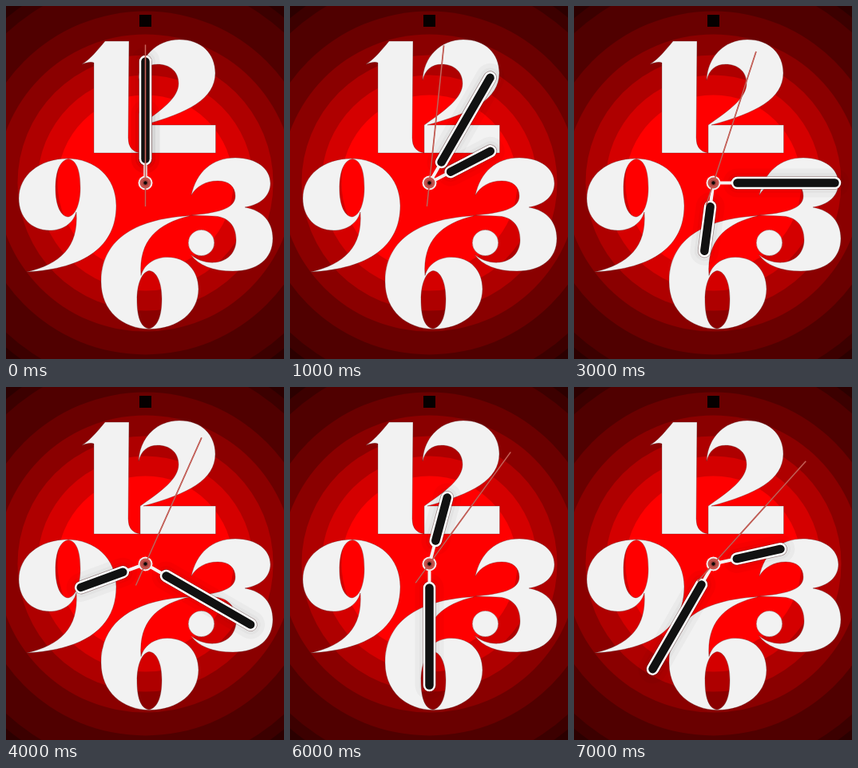
Animation of 348 by 442 pixels, one loop 8000 ms. Source, as an HTML page:

```html
<!DOCTYPE html>
<html lang="en">
<head>
<meta charset="utf-8">
<title>Red clock</title>
<style>
html, body { margin: 0; width: 100%; height: 100%; overflow: hidden; background: #2b0000; }
svg { display: block; width: 348px; height: 442px; }
.digits { fill: #f2f2f2; fill-rule: evenodd; stroke: #5a2020; stroke-opacity: .55; stroke-width: .6; }
.hand { fill: none; stroke-linecap: round; }
</style>
</head>
<body>
<svg viewBox="0 0 348 442">
  <defs>
    <path id="nine" d="M77 191C111 191 138 214 138 250C138 300 100 329 26 333C68 323 91 302 88 258C84 273 70 281 55 281C31 281 16 264 16 241C16 212 42 191 77 191Z
      M78 191.500C66 194 62 210 62 229C62 250 69 264 78 264C88 262 93 245 93 228C93 208 89 193 78 191.500Z"/>
  </defs>
  <g id="rings"></g>
  <rect x="167" y="11" width="15" height="15" fill="#050000"/>
  <g class="digits">
    <path d="M95 73C106 66 114 56 124 44H154L153 165Q153 182 168 184H110V71Q105 69 95 73Z"/>
    <path d="M166 93C167 64 188 42 217 42C245 42 262 60 262 84C262 116 228 134 172 149H262.500V184H168V149C195 130 216 115 216 97C216 82 205 73 190 73C177 73 169 80 166 93Z"/>
    <path d="M232 237C238 208 258 190 287 190C314 190 331 204 331 222C331 238 318 249 299 252C322 256 334 271 334 291C334 317 314 332 284 332C259 332 241 325 231 311C239 318 250 322 262 321C280 319 288 306 288 293C288 275 278 263 258 263L232 262C262 259 287 255 287 238C287 226 279 219 265 219C250 219 238 226 232 237Z"/>
    <circle cx="244.500" cy="296.500" r="16.300"/>
    <use href="#nine"/>
    <use href="#nine" transform="rotate(180 128.500 297.750)"/>
  </g>
  <g transform="translate(174.500 221.500)">
    <g id="hour"></g>
    <g id="minute"></g>
    <circle r="9" fill="#f4eeee"/>
    <g id="second">
      <path d="M0 29.500V-173" stroke="#b5443d" stroke-width="1.700"/>
      <path d="M0 29.500V-173" stroke="#d8897f" stroke-width=".5"/>
    </g>
    <circle r="7" fill="#c8524c"/>
    <circle r="4" fill="#a8443e"/>
    <circle r="2.200" fill="#100808"/>
  </g>
</svg>
<script>
const el = id => document.getElementById(id);

const bands = [[270, "#3c0000"], [256, "#500000"], [215, "#6a0000"], [186, "#8a0000"],
  [160, "#ae0000"], [135, "#d40000"], [110, "#ff0000"]];
el("rings").innerHTML = '<rect width="348" height="442" fill="#2b0000"/>' +
  bands.map(([r, c]) => `<circle cx="174.500" cy="221.500" r="${r}" fill="${c}"/>`).join("");

const stroke = (from, to, color, width, alpha = 1) =>
  `<path class="hand" d="M0 ${-from}V${-to}" stroke="${color}" stroke-width="${width}" stroke-opacity="${alpha}"/>`;

function buildHand(id, tip) {
  el(id).innerHTML =
    stroke(30, tip, "#000", 36, .03) +
    stroke(30, tip, "#000", 25, .03) +
    stroke(30, tip, "#300", 17, .4) +
    stroke(0, 30, "#f6f2f2", 4) +
    stroke(30, tip, "#fff", 15.5) +
    stroke(30, tip, "#111", 10.5);
}
buildHand("hour", 86);
buildHand("minute", 152);

// Degrees turned at each one-second tick.
const steps = { hour: 62.5, minute: 30, second: 6 };

function draw(ms) {
  const tick = Math.floor(ms % 8000 / 1000);
  for (const id in steps) el(id).setAttribute("transform", `rotate(${tick * steps[id]})`);
}

let start;
function loop(now) {
  start ??= now;
  draw(now - start);
  requestAnimationFrame(loop);
}
draw(0);
requestAnimationFrame(loop);
</script>
</body>
</html>
```
